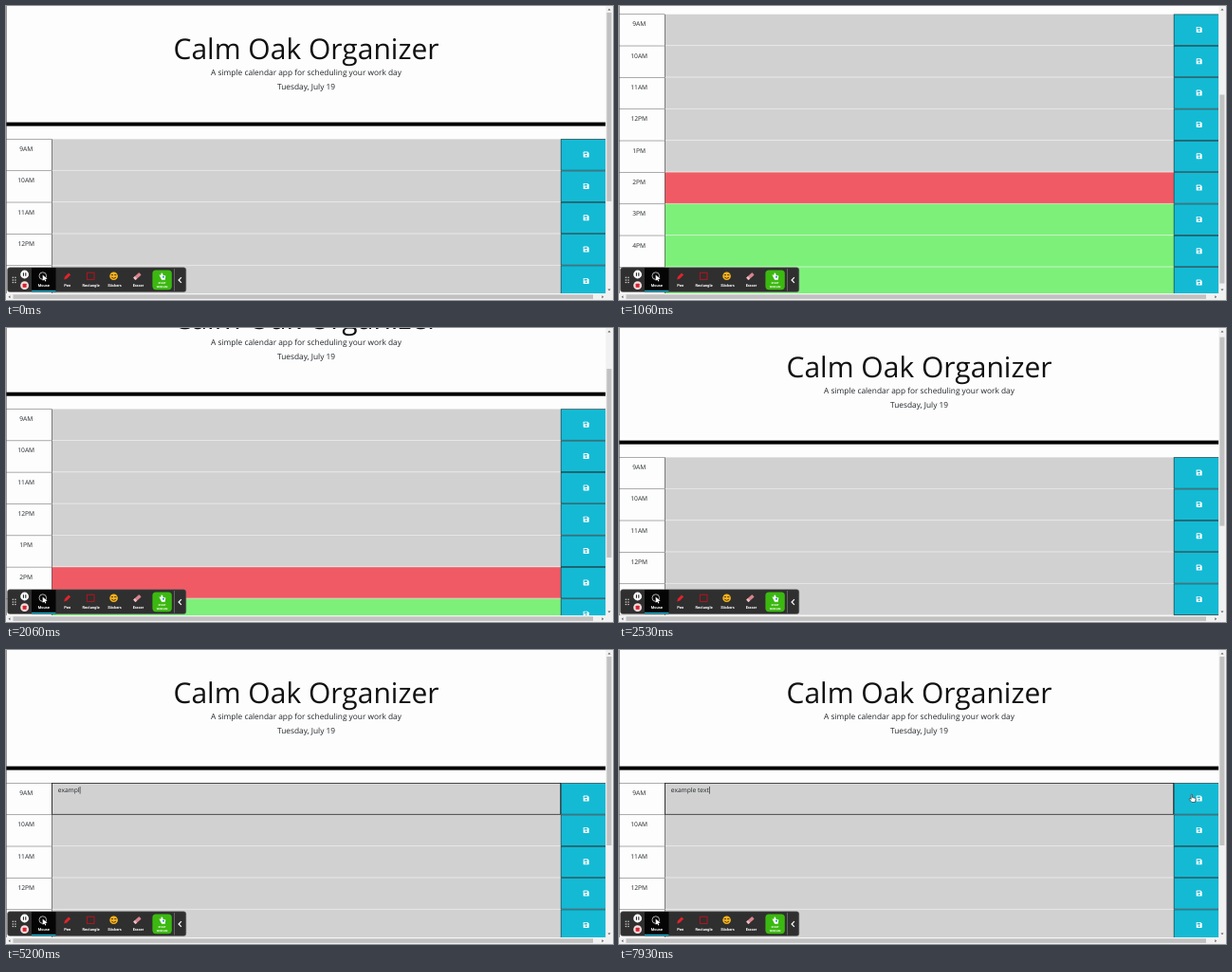
An HTML page for the animation above (8 s loop, 640 by 310 pixels).

```html
<!DOCTYPE html>
<html lang="en">
<head>
<meta charset="utf-8">
<title>Day planner</title>
<style>
  html, body { margin: 0; width: 100%; height: 100%; overflow: hidden; background: #fdfdfd; }
  svg { display: block; width: 640px; height: 310px; }
  text { font-family: "Open Sans", sans-serif; fill: #212529; text-rendering: geometricPrecision; }
  .mid { text-anchor: middle; }
  .title { font-size: 30px; fill: #111; }
  .lead { font-size: 8.333px; }
  .body { font-size: 6.667px; }
  .tool { font: 700 4px Roboto, sans-serif; fill: #fff; text-anchor: middle; }
  .tiny { font: 700 2.7px Roboto, sans-serif; fill: #fff; text-anchor: middle; }
</style>
</head>
<body>
<svg viewBox="0 0 640 310">
  <defs>
    <clipPath id="view"><rect width="632.3" height="303"/></clipPath>
    <g id="save">
      <path d="M-2.4-3H1.5L3-1.5V2.4Q3 3 2.4 3H-2.4Q-3 3-3 2.4V-2.4Q-3-3-2.4-3Z" fill="#fff"/>
      <path d="M-2.1-2.1H1.1V-.5H-2.1Z" fill="#14bad4"/>
      <circle cy="1.2" r=".95" fill="#14bad4"/>
    </g>
  </defs>
  <rect width="640" height="310" fill="#fdfdfd"/>

  <g clip-path="url(#view)">
    <g id="page">
      <text class="mid title" x="316.5" y="55.7">Calm Oak Organizer</text>
      <text class="mid lead" x="316.5" y="73">A simple calendar app for scheduling your work day</text>
      <text class="mid lead" x="316.5" y="88">Tuesday, July 19</text>
      <rect y="122.6" width="633" height="4"/>
      <g id="rows"></g>
      <g id="focus">
        <rect x="48.5" y="140.5" width="536.2" height="32.8" fill="none" stroke="#222" stroke-width=".8"/>
        <text id="entry" class="body" x="54.8" y="150.1" xml:space="preserve"></text>
        <rect id="caret" y="144" width=".6" height="7.6" fill="#111"/>
      </g>
    </g>
  </g>
  <rect width=".6" height="303" fill="#555"/>

  <!-- scrollbars -->
  <rect x="632.3" width="7.7" height="310" fill="#f1f1f1"/>
  <rect y="303.3" width="640" height="6.7" fill="#f1f1f1"/>
  <rect id="thumb" x="633.4" y="7" width="5" height="199" fill="#c1c1c1"/>
  <rect x="7.5" y="304.3" width="611.5" height="4.6" fill="#c1c1c1"/>
  <g fill="#505050">
    <path d="M634.5 4.4h3l-1.5-1.7z"/>
    <path d="M634.5 298.6h3l-1.5 1.7z"/>
    <path d="M4.4 305.2v3l-1.7-1.5z"/>
    <path d="M628.4 305.2v3l1.7-1.5z"/>
  </g>

  <!-- recorder toolbar -->
  <rect x="1.5" y="275.7" width="188.3" height="25.8" rx="2.5" fill="#2f2f2f" stroke="#666" stroke-width=".5"/>
  <rect x="27" y="276" width="25.5" height="25.3" fill="#050505"/>
  <rect x="27" y="299.8" width="25.5" height="1.5" fill="#17a9c9"/>
  <g id="grip" fill="#ddd"></g>
  <circle cx="19.6" cy="283" r="4.4" fill="#fff"/>
  <path d="M18.4 281.2v3.6M20.8 281.2v3.6" stroke="#222" stroke-width="1.1"/>
  <circle cx="19.6" cy="294.7" r="4.4" fill="#f3dede"/>
  <rect x="17.6" y="292.7" width="4" height="4" rx=".5" fill="#d8222e"/>
  <circle cx="38.8" cy="284.6" r="3.8" fill="none" stroke="#ddd" stroke-width=".8"/>
  <path d="M38.6 283.6l5 4.2-2.2.3 1 2-1 .5-1-2.1-1.6 1.3z" fill="#fff"/>
  <path d="M61.2 288.6l.8-3 4-4.2 2.2 2-4 4.2z" fill="#e1232d"/>
  <rect x="85.4" y="281.2" width="7.6" height="7.2" fill="none" stroke="#b3141f"/>
  <circle cx="113.6" cy="284.8" r="4.3" fill="#f7b51d"/>
  <path d="M110.8 283.6h2.2M114.2 283.6h2.2M111.2 286q2.4 2.6 4.8 0" fill="none" stroke="#5b3511"/>
  <g transform="rotate(-42 138.4 285)">
    <rect x="134.2" y="283.2" width="8.4" height="3.6" rx=".8" fill="#d98490"/>
    <rect x="134.2" y="283.2" width="2.4" height="3.6" rx=".8" fill="#e6c3c7"/>
  </g>
  <g id="tools"></g>
  <rect x="154.4" y="278.4" width="20.4" height="20.8" rx="3.6" fill="#3cb911"/>
  <path d="M161.4 283.4l2 .4.3-2.2 1.4.2.4 2 2.8.7-.6 4.2h-3.6z" fill="#fff"/>
  <path d="M165 284.8h2v1.8h-2z" fill="#3c8fd0"/>
  <text class="tiny" x="164.6" y="293.3">START</text>
  <text class="tiny" x="164.6" y="296.7">WEBCAM</text>
  <rect x="177" y="277" width=".7" height="23.5" fill="#777"/>
  <path d="M184.9 286.2l-2.8 2.8 2.8 2.8" fill="none" stroke="#fff" stroke-width="1.2"/>

  <path id="hand" fill="#fff" stroke="#222" stroke-width=".6" stroke-linejoin="round"
    d="M-1.2-4q.8-.8 1.3 0v3l2.6.6q1.1.3 1 1.3L3.1 4H-.5L-3.2.8q0-1 1-.7l1 .8z"/>
</svg>
<script>
const $ = id => document.getElementById(id);
const LOOP = 8000, FRAME = 1000 / 15, ROW = 100 / 3;
const PHRASE = "example text";
const KEYS = [4060, 4330, 4600, 4800, 5060, 5200, 5330, 5400, 5600, 5730, 6260, 6530];
// [ms, scroll offset]
const SCROLL = [[0, 0], [600, 92.4], [867, 138], [933, 138], [1733, 100], [1800, 96],
  [2267, 24], [2400, 24], [2533, 4], [2733, 0], [LOOP, 0]];

const rowColor = i => i < 5 ? "#d1d1d1" : i === 5 ? "#f05a64" : "#7df07a";
const hourName = h => (h > 12 ? h - 12 : h) + (h < 12 ? "AM" : "PM");

$("rows").innerHTML = Array.from({ length: 9 }, (_, i) => `
  <g transform="translate(0 ${140 + i * ROW})">
    <rect width="48" height=".7" fill="#888"/>
    <text class="body mid" x="21.2" y="13">${hourName(i + 9)}</text>
    <rect x="48" y=".4" width="537" height="${ROW}" fill="${rowColor(i)}"/>
    <rect x="48" y="${ROW - .4}" width="537" height=".8" fill="#f4f4f4" opacity=".85"/>
    <rect x="48" y=".4" width=".7" height="${ROW}" fill="#555"/>
    <rect x="584.8" y=".2" width="48" height="${ROW}" fill="#1c3f47"/>
    <rect x="585.5" y=".9" width="47" height="${ROW - 1.4}" fill="#14bad4"/>
    <use href="#save" x="611.7" y="16.6"/>
  </g>`).join("");

$("grip").innerHTML = [0, 1, 2, 3, 4, 5].map(i =>
  `<circle cx="${7.3 + i % 2 * 2.6}" cy="${286.2 + (i >> 1) * 2.7}" r=".75"/>`).join("");

$("tools").innerHTML = ["Mouse", "Pen", "Rectangle", "Stickers", "Eraser"].map((name, i) =>
  `<text class="tool" x="${39.8 + i * 24.9}" y="296">${name}</text>`).join("");

function scrollAt(t) {
  const i = SCROLL.findIndex(p => p[0] > t);
  const [t0, y0] = SCROLL[i - 1], [t1, y1] = SCROLL[i];
  return y0 + (y1 - y0) * (t - t0) / (t1 - t0);
}

const show = (id, on) => $(id).setAttribute("visibility", on ? "inherit" : "hidden");
let typed = -1;

function draw(t) {
  const s = Math.min(Math.floor((t + 7) / FRAME) * FRAME, LOOP - 1);
  const y = scrollAt(s);
  $("page").setAttribute("transform", `translate(0 ${-y})`);
  $("thumb").setAttribute("y", 7 + y * .657);

  const count = KEYS.filter(k => t >= k).length;
  if (count !== typed) {
    typed = count;
    $("entry").textContent = PHRASE.slice(0, count);
  }
  $("caret").setAttribute("x", 55 + (count ? $("entry").getComputedTextLength() : 0));
  show("focus", t >= 3660);
  show("caret", t >= 3660 && (t < 7060 || t >= 7600));

  const left = Math.max(0, 1 - (s - 7800) / 133);
  $("hand").setAttribute("transform", `translate(${604.4 - left * 14} ${156.5 + left * 6})`);
  show("hand", t >= 7800);
}

const start = performance.now();
(function tick() {
  draw((performance.now() - start) % LOOP);
  requestAnimationFrame(tick);
})();
</script>
</body>
</html>
```
